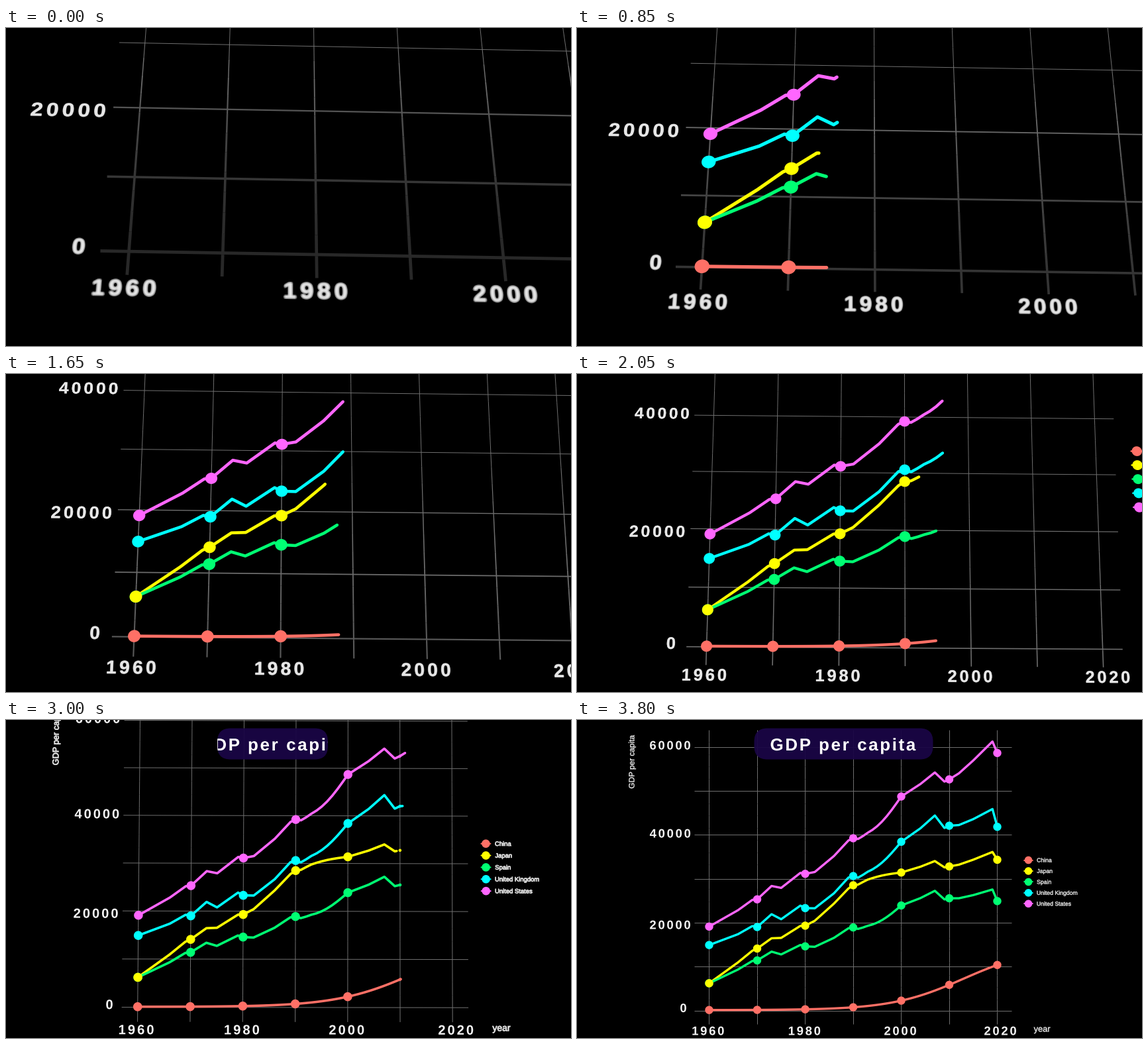
Recreate the animation shown at these times as a matplotlib script. Size 853 by 480 pixels, loop 6000 ms.

```python
import numpy as np
import matplotlib.pyplot as plt
from matplotlib.animation import FuncAnimation
from matplotlib.collections import LineCollection, PolyCollection
from matplotlib.patches import FancyBboxPatch, PathPatch
from matplotlib.path import Path
from matplotlib.textpath import TextPath

W, H, DPI = 853, 480, 64
PX = 72 / DPI
STEP, FRAMES = 50, 120
MOVE_END, DRAW_END = 3.8, 3.63

# Chart plane, in the pixels of the final flat view
X0, Y0 = 199, 438
YEAR, KILO = 7.25, 6.633
QUAD = np.array([(199, 438), (634, 438), (634, 172.7), (199, 172.7)])

# Corners of QUAD in the first view, and how far each path bows
START = np.array([(185, 336.7), (1031.5, 351), (954.6, -54.5), (216.3, -69.1)])
BOW = np.array([(.5, .57), (0, .56), (-.24, -.27), (0, -.24)])

YEARS = np.arange(60, 121)
DECADES = YEARS[::10]

# Booms and slumps shared by all rich economies: (year since 1900, offset)
CYCLE = [(60, 0), (66, 0), (69, .5), (70, 0), (73, 1.3), (75, -.3), (79, .8),
         (80, 0), (82, -1.2), (86, -.8), (89, .3), (90, 0), (91, -.5),
         (93, 0), (100, 0), (104, 1.2), (107, 2.6), (109, -.3), (112, 0),
         (115, 1.2), (119, 3.2), (120, 0)]


def economy(levels, gain, sag):
    """Decade levels, plus the shared cycle and a sag in the nineties."""
    nineties = np.sin(np.pi * (np.clip(YEARS, 90, 100) - 90) / 10)
    return (np.interp(YEARS, DECADES, levels)
            + gain * np.interp(YEARS, *zip(*CYCLE)) - sag * nineties)


china = .1 + 14.3 / (1 + np.exp((113 - YEARS) / 7.5))
japan = economy([6.2, 14.1, 19.3, 28.5, 31.4, 32.9, 34.3], .6, -.5)
spain = economy([6.2, 11.4, 14.6, 18.9, 23.9, 25.7, 24.9], .8, 1.4)
kingdom = economy([14.9, 19, 23.3, 30.6, 38.4, 42.3, 41.8], 1.25, 1.7)
states = economy([19.1, 25.3, 31.1, 39.2, 48.7, 52.8, 58.6], 1, 2)
SERIES = [("China", "#ff7066", china), ("Japan", "#ffff00", japan),
          ("Spain", "#00ff73", spain), ("United Kingdom", "#00ffff", kingdom),
          ("United States", "#ff66ff", states)]
COLORS = [color for _, color, _ in SERIES]
DOT_ORDER = [0, 2, 1, 3, 4]
LEGEND_Y = 211 + 16.45 * np.arange(5)


def smooth(p):
    p = min(max(p, 0), 1)
    return p * p * (3 - 2 * p)


def homography(ease):
    path = ease + BOW * ease * (1 - ease)
    dst = START + (QUAD - START) * path
    rows, rhs = [], []
    for (x, y), (u, v) in zip(QUAD, dst):
        rows += [[x, y, 1, 0, 0, 0, -u * x, -u * y],
                 [0, 0, 0, x, y, 1, -v * x, -v * y]]
        rhs += [u, v]
    m = np.append(np.linalg.solve(rows, rhs), 1).reshape(3, 3)
    return m, np.ptp(dst[:2, 0]) / np.ptp(QUAD[:2, 0])


def project(m, pts):
    q = np.column_stack([pts, np.ones(len(pts))]) @ m.T
    return q[:, :2] / q[:, 2:]


def depth(y):
    """Out-of-focus weight: full on the zero line, none from 30000 up."""
    return np.clip(1 - (Y0 - y) / (30 * KILO), 0, 1.3)


def glyphs(text, size, x, y, center=True, bold=True, track=0, upright=False):
    """Outline of tracked text with its baseline at y."""
    font = dict(family="Liberation Sans", weight="bold" if bold else "normal")

    def outline(s):
        return TextPath((0, 0), s, size=size, prop=font)

    mark = outline("l").get_extents().x1
    verts, codes = [], []
    left, right = np.inf, -np.inf
    for i, char in enumerate(text):
        if char == " ":
            continue
        dx = outline(text[:i] + "l").get_extents().x1 - mark + i * track
        path = outline(char)
        box = path.get_extents()
        left, right = min(left, box.x0 + dx), max(right, box.x1 + dx)
        verts.append(path.vertices + (dx, 0))
        codes.append(path.codes)
    verts = np.vstack(verts) - ((left + right) / 2 if center else left, 0)
    px, py = verts.T
    flat = np.column_stack([-py, -px] if upright else [px, -py])
    return flat + (x, y), np.concatenate(codes)


fig = plt.figure(figsize=(W / DPI, H / DPI), dpi=DPI, facecolor="black")
ax = fig.add_axes([0, 0, 1, 1])
ax.set_xlim(-.5, W - .5)
ax.set_ylim(H - .5, -.5)
ax.axis("off")


class SoftText:
    """Text in the plane, blurred by overlaying shifted copies."""
    COPIES = 7

    def __init__(self, parts, color, edge=0):
        self.verts = np.vstack([verts for verts, _ in parts])
        self.codes = np.concatenate([codes for _, codes in parts])
        self.weight = depth(self.verts[:, 1])
        self.patches = [ax.add_patch(PathPatch(
            Path(self.verts, self.codes), fc=color, ec=color,
            lw=edge * PX, zorder=2)) for _ in range(self.COPIES)]

    def update(self, m, radius):
        pts = project(m, self.verts)
        radius = np.broadcast_to(radius, len(pts))
        sharp = radius.max() < .12
        for k, patch in enumerate(self.patches):
            patch.set_visible(k == 0 or not sharp)
            patch.set_alpha(1 if sharp else .34)
            a = 2 * np.pi * k / (self.COPIES - 1)
            ring = np.array([np.cos(a), np.sin(a)]) * (k > 0)
            patch.set_path(Path(pts + radius[:, None] * ring, self.codes))


# Grid
grid_segs = [[(177, y), (656, y)] for y in Y0 - 10 * KILO * np.arange(7)]
cuts = np.linspace(458, 14, 25)
for x in X0 + 10 * YEAR * np.arange(7):
    grid_segs += [[(x, a), (x, b)] for a, b in zip(cuts, cuts[1:])]
grid_segs = np.array(grid_segs, float)
grid_depth = np.minimum(depth(grid_segs[:, :, 1].mean(axis=1)), 1)
grid = ax.add_collection(LineCollection([], zorder=1, capstyle="butt"))

# Labels
ticks = [glyphs(s, 18.5, x, y, track=2.7) for s, x, y in (
    ("60000", 140, 44), ("40000", 140, 177), ("20000", 140, 315),
    ("0", 160, 440.5), ("1960", 197.5, 475), ("1980", 343, 475),
    ("2000", 487.5, 475), ("2020", 638.5, 475))]
tick_text = SoftText(ticks, "#f6f6f6")
small = [glyphs(name, 8.7, 694, y + 3, center=False, bold=False)
         for (name, _, _), y in zip(SERIES, LEGEND_Y)]
small += [glyphs("year", 12.8, 701.5, 470, bold=False),
          glyphs("GDP per capita", 11.85, 86, 62.5, bold=False, upright=True)]
small_text = SoftText(small, "#e8e8e8", edge=.4)

# Curves and dots
curves = []
for _, _, values in SERIES:
    pts = np.column_stack([X0 + YEAR * (YEARS - 60), Y0 - KILO * values])
    run = np.append(0, np.cumsum(np.hypot(*np.diff(pts, axis=0).T)))
    curves.append((pts, run))
dot_colors = [COLORS[i] for i in DOT_ORDER for _ in DECADES] + COLORS
lines = ax.add_collection(LineCollection(
    [], colors=COLORS * 2, zorder=3, capstyle="round", joinstyle="round"))
dots = ax.add_collection(PolyCollection(
    [], facecolors=dot_colors, edgecolors="none", zorder=4))
angle = np.linspace(0, 2 * np.pi, 32, endpoint=False)
CIRCLE = np.column_stack([np.cos(angle), np.sin(angle)])

# Title
pill = ax.add_patch(FancyBboxPatch(
    (267, 12), 270, 47, boxstyle="round,pad=0,rounding_size=20",
    fc="#1a0645", ec="none", alpha=.95, zorder=5))
title = ax.add_patch(PathPatch(
    Path(*glyphs("GDP per capita", 26, 401.5, 45.5, track=2.6)),
    fc="white", ec="none", zorder=6))


def trimmed(pts, run, part):
    """Leading part of a polyline, by arc length."""
    end = part * run[-1]
    tip = [np.interp(end, run, pts[:, 0]), np.interp(end, run, pts[:, 1])]
    return np.vstack([pts[run < end], tip])


def draw(frame):
    t = frame * STEP / 1000
    ease = smooth(min(t / MOVE_END, 1) ** .92)
    m, scale = homography(ease)
    blur = 3.8 * (1 - ease) ** 2

    grid.set_segments(project(m, grid_segs.reshape(-1, 2)).reshape(-1, 2, 2))
    width = 1 + blur * grid_depth
    grid.set_linewidths(width * PX)
    gray = np.minimum(.43, .75 / width)
    grid.set_color(np.repeat(gray[:, None], 3, axis=1))

    tick_text.update(m, .4 * blur * tick_text.weight)
    small_text.update(m, .8 * min(max(3.35 - t, 0), 1))

    part = min(t / DRAW_END, 1)
    shapes = [project(m, trimmed(*c, part)) for c in curves] if t else []
    shapes += [project(m, np.array([(674.5, y), (687.5, y)]))
               for y in LEGEND_Y]
    lines.set_segments(shapes)
    lines.set_linewidths([3.4 * scale ** .7 * PX] * 5 + [1.8 * scale * PX] * 5)

    sizes = 6.2 * np.clip((t - .059 * (DECADES - 60)) / .15, 0, 1)
    polys = [project(m, spot + r * CIRCLE) for i in DOT_ORDER
             for spot, r in zip(curves[i][0][::10], sizes)]
    polys += [project(m, (681, y) + 5.8 * CIRCLE) for y in LEGEND_Y]
    dots.set_verts(polys)

    grow = smooth((t - 2.6) / .69)
    wide = max(270 * grow, 41)
    pill.set_bounds(402 - wide / 2, 12, wide, 47)
    title.set_clip_path(pill)
    for item in (pill, title):
        item.set_visible(grow > 0)
    return []


anim = FuncAnimation(fig, draw, frames=FRAMES, interval=STEP, repeat=True)
plt.show()
```
